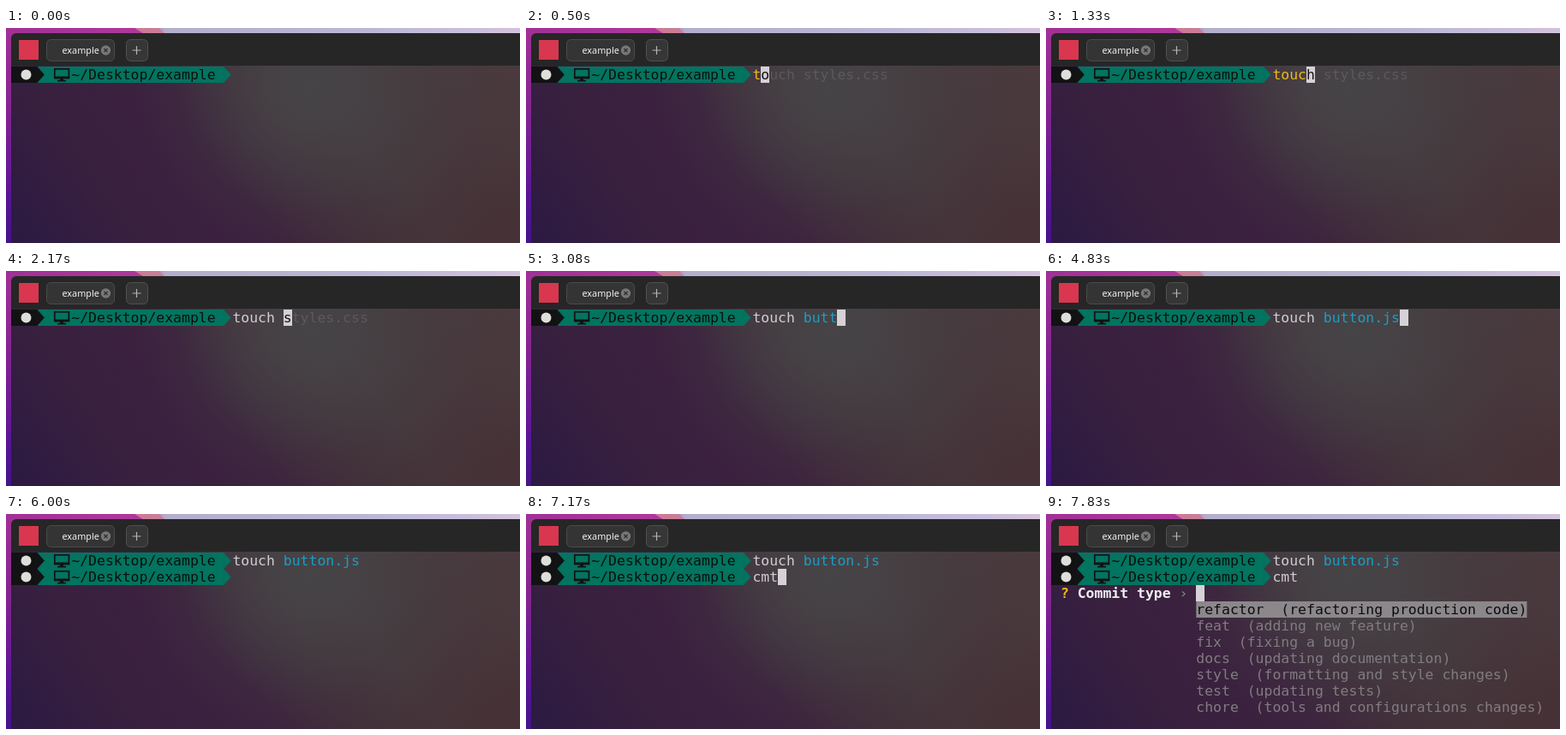
An HTML page with a canvas that plays this animation: 600x251 px, repeating every 8000 ms.

```html
<!DOCTYPE html>
<html lang="en">
<head>
<meta charset="utf-8">
<title>Terminal session</title>
<style>
  html, body { margin: 0; width: 100%; height: 100%; overflow: hidden; background: #262627; }
  canvas { display: block; width: 600px; height: 251px; }
</style>
</head>
<body>
<canvas id="stage" width="600" height="251"></canvas>
<script>
const W = 600, H = 251, LOOP = 8000, BLINK = 500;
const EDGE = 6, LEFT = 7, TOP = 45, CELL = 9.9, ROW = 19, ASCENT = 15.2;
const MONO = '16.44px "DejaVu Sans Mono", monospace';
const TEXT = '#cfcdd0', GHOST = '#5d585d', YELLOW = '#efb81c', CYAN = '#1c9dc4';
const CURSOR = '#d6d1d6', TEAL = '#02745f', BLACK = '#121214', DIM = '#817c81';

// Each key: [time, character]
const FIRST = [[420, 't'], [670, 'o'], [920, 'u'], [1170, 'c'], [1500, 'h'], [1750, ' '],
  [2420, 'b'], [2580, 'u'], [2750, 't'], [3000, 't'], [3420, 'o'], [3745, 'n'],
  [4330, '.'], [4500, 'j'], [4670, 's']];
const SECOND = [[6490, 'c'], [6750, 'm'], [7000, 't']];
const WAKE = 80, ENTER_1 = 5330, PROMPT_2 = 5450, ENTER_2 = 7330, MENU = 7580;
const CHOICES = [
  'refactor  (refactoring production code)',
  'feat  (adding new feature)',
  'fix  (fixing a bug)',
  'docs  (updating documentation)',
  'style  (formatting and style changes)',
  'test  (updating tests)',
  'chore  (tools and configurations changes)'
];

const stage = document.getElementById('stage');
const screen = stage.getContext('2d');
const backdrop = document.createElement('canvas');
backdrop.width = W;
backdrop.height = H;
let g = backdrop.getContext('2d');

const colX = col => LEFT + col * CELL;
const rowY = row => TOP + row * ROW;

function rect(x, y, w, h, color) {
  g.fillStyle = color;
  g.fillRect(x, y, w, h);
}

function shape(points, color) {
  g.fillStyle = color;
  g.beginPath();
  points.forEach(([x, y]) => g.lineTo(x, y));
  g.fill();
}

function disc(x, y, r, color) {
  g.fillStyle = color;
  g.beginPath();
  g.arc(x, y, r, 0, 7);
  g.fill();
}

function line(color, width, ...pairs) {
  g.strokeStyle = color;
  g.lineWidth = width;
  g.beginPath();
  for (const [x1, y1, x2, y2] of pairs) {
    g.moveTo(x1, y1);
    g.lineTo(x2, y2);
  }
  g.stroke();
}

function gradient(x1, y1, x2, y2, stops) {
  const fill = g.createLinearGradient(x1, y1, x2, y2);
  stops.forEach(([at, color]) => fill.addColorStop(at, color));
  return fill;
}

function glow(x, y, r, rgb, alpha) {
  const fill = g.createRadialGradient(x, y, 0, x, y, r);
  [1, .84, .5, .16, 0].forEach((k, i) => fill.addColorStop(i / 4, `rgba(${rgb},${alpha * k})`));
  rect(EDGE, 44, W, H, fill);
}

function pill(x, y, w, h, r, fill, border) {
  g.beginPath();
  g.roundRect(x, y, w, h, r);
  g.fillStyle = fill;
  g.fill();
  g.strokeStyle = border;
  g.lineWidth = 1;
  g.stroke();
}

function paintWallpaper() {
  rect(0, 0, W, EDGE + 6, gradient(0, 0, W, 0, [[0, '#a03096'], [.26, '#b0389a'],
    [.31, '#b4aecd'], [.7, '#bcb6d6'], [.9, '#c9bedb'], [1, '#d3c2dc']]));
  shape([[150, 0], [178, 0], [185, EDGE], [160, EDGE]], '#cb7c96');
  rect(0, EDGE, EDGE + 6, H, gradient(0, EDGE, 0, H, [[0, '#a03096'], [.35, '#852490'],
    [.65, '#691996'], [.8, '#561596'], [1, '#441488']]));
}

function paintWindow() {
  g.save();
  g.beginPath();
  g.roundRect(EDGE, EDGE, W, H, 6);
  g.clip();
  rect(EDGE, 44, W, H, gradient(10, 250, 512, -89, [[0, '#2c1a42'], [.2, '#38203f'],
    [.42, '#3c223e'], [.56, '#42303a'], [.68, '#45393e'], [1, '#4a3a3e']]));
  glow(600, 270, 220, '68,43,48', .6);
  glow(350, 70, 200, '70,69,71', .9);
  rect(EDGE, EDGE, W, 38, '#262627');
  g.restore();

  rect(15, 14, 23, 23, '#d8374f');
  pill(47.5, 13.5, 79, 25, 5, '#343435', '#4b4b4c');
  pill(140.5, 13.5, 25, 25, 5, '#363637', '#515152');
  line('#b4b4b5', 1.2, [147.5, 26, 157.5, 26], [152.5, 21, 152.5, 31]);
  disc(116.5, 26, 5.7, '#777778');
  line('#2c2c2d', 1.1, [114.5, 24, 118.5, 28], [118.5, 24, 114.5, 28]);
  g.fillStyle = '#f2f2f2';
  g.font = '10.8px "Noto Sans", "Open Sans", sans-serif';
  g.fillText('example', 65.5, 30);
}

function write(text, col, row, color, bold) {
  g.font = (bold ? 'bold ' : '') + MONO;
  g.fillStyle = color;
  [...text].forEach((ch, i) => g.fillText(ch, colX(col + i), rowY(row) + ASCENT));
}

function monitor(x, y) {
  g.strokeStyle = BLACK;
  g.lineWidth = 1.7;
  g.strokeRect(x + .8, y + .8, 16.6, 10.6);
  rect(x, y + 9.5, 18.2, 2.7, BLACK);
  rect(x + 7, y + 12, 4, 3, BLACK);
  rect(x + 4, y + 13.8, 10, 1.7, BLACK);
}

function prompt(row) {
  const y = rowY(row), black = colX(3), teal = colX(25);
  const arrow = (x, color) => shape([[x, y], [x + 8.5, y + ROW / 2], [x, y + ROW]], color);
  rect(black, y, teal - black, ROW, TEAL);
  arrow(teal - .3, TEAL);
  rect(EDGE, y, black - EDGE, ROW, BLACK);
  arrow(black - .3, BLACK);
  disc(23.5, y + ROW / 2, 6, '#dededb');
  monitor(56, y + 2);
  write('~/Desktop/example', 7, row, '#0b0f0e');
}

function typed(keys, t) {
  return keys.filter(([at]) => at <= t).map(([, ch]) => ch).join('');
}

// Known commands turn grey, unfinished ones stay yellow.
function command(text, name, row) {
  const done = text.length >= name.length;
  write(text.slice(0, name.length), 26, row, done ? TEXT : YELLOW);
  write(text.slice(name.length), 26 + name.length, row, CYAN);
}

function cursor(col, row, t, since, under = '') {
  if (t < since || Math.floor((t - since) / BLINK) % 2) return;
  rect(Math.round(colX(col)), rowY(row), 10, ROW, CURSOR);
  write(under, col, row, '#151315');
}

function editLine(t, keys, name, full, row, start, enter) {
  const text = typed(keys, t), col = 26 + text.length;
  prompt(row);
  command(text, name, row);
  if (t >= enter) return;
  const last = keys.reduce((a, [at]) => at <= t ? at : a, start);
  const ghost = text && full.startsWith(text) ? full.slice(text.length) : '';
  write(ghost, col, row, GHOST);
  cursor(col, row, t, last, ghost.charAt(0));
}

function menu(t) {
  write('?', 1, 2, YELLOW, true);
  write('Commit type', 3, 2, '#efedf0', true);
  write('›', 15, 2, '#8b868b');
  cursor(17, 2, t, MENU);
  CHOICES.forEach((label, i) => {
    if (!i) rect(colX(17), rowY(3), label.length * CELL, ROW, '#8b878b');
    write(label, 17, i + 3, i ? DIM : '#0d0c0d');
  });
}

function draw(t) {
  g.drawImage(backdrop, 0, 0);
  editLine(t, FIRST, 'touch', 'touch styles.css', 0, WAKE, ENTER_1);
  if (t >= PROMPT_2) editLine(t, SECOND, 'cmt', 'cmt', 1, PROMPT_2, ENTER_2);
  else if (t >= ENTER_1) cursor(0, 1, t, ENTER_1);
  if (t >= MENU) menu(t);
  else if (t >= ENTER_2) cursor(0, 2, t, ENTER_2);
}

paintWallpaper();
paintWindow();
g = screen;
const start = performance.now();
function tick() {
  draw((performance.now() - start) % LOOP);
  requestAnimationFrame(tick);
}
tick();
</script>
</body>
</html>
```
